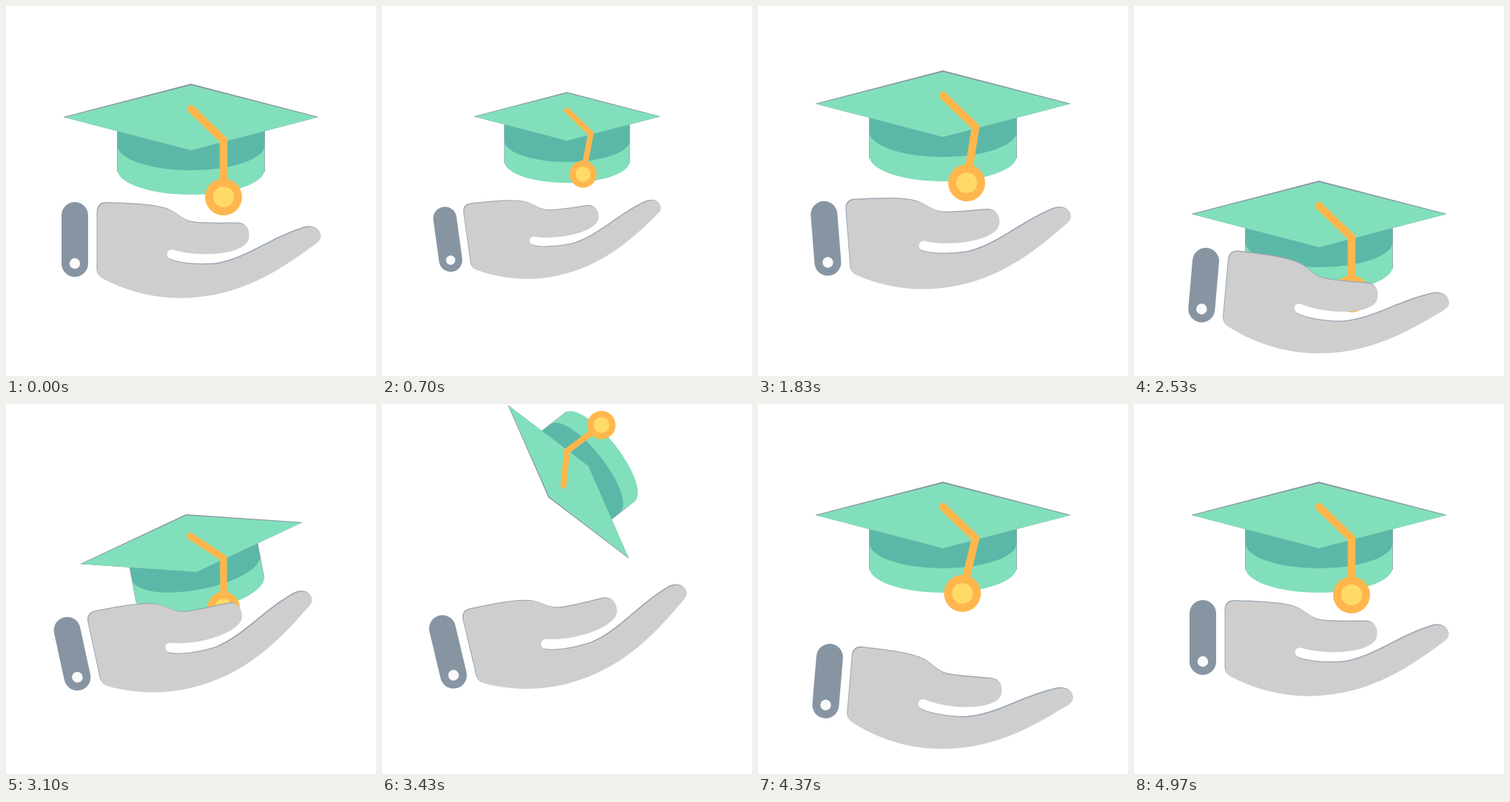
Animation, 500 px wide and 500 px high, one loop 5010 ms. Source, as an HTML page:

```html
<!DOCTYPE html>
<html lang="en">
<head>
<meta charset="utf-8">
<title>Graduation cap and hand</title>
<style>
html, body { margin: 0; width: 100%; height: 100%; overflow: hidden; background: #fff; }
svg { display: block; width: 100%; height: 100%; }
</style>
</head>
<body>
<svg viewBox="0 0 500 500">
  <defs>
    <path id="palm" d="M123 279Q123.500 266 136 266C170 267 205 268 222 276C238 284 240 292 262 293
      S295 293.500 312 293.500C325 293.500 329 302 328 312C327 322 318 326 308 330C285 337 250 337 225 329
      C216 328 215 338 221 342C235 349 265 350 285 348C325 341 355 315 401 300C412 296 425 300 425 311
      C425 318 415 323 407 329C350 371 300 394 234 394.500C190 394 155 381 131 368.500Q123.500 365 123 357Z"/>
    <path id="brim" d="M250 105L423 150L250 195L77 150Z"/>
  </defs>
  <g id="cap">
    <g id="body">
      <path fill="#82dfbb" d="M150.500 155V221A99.500 34 0 0 0 349.500 221V155Z"/>
      <path fill="#5bb8a8" d="M150.500 155V188A99.500 34 0 0 0 349.500 188V155Z"/>
      <path fill="none" stroke="#8795a3" stroke-opacity=".7" d="M150.500 160V224M349.500 160V224"/>
    </g>
    <g id="board">
      <use href="#brim" fill="#8795a3"/>
      <path fill="#82dfbb" d="M250 107L421 150.500L250 195L79 150.500Z"/>
      <g fill="none" stroke="#ffb74d" stroke-width="10.500" stroke-linecap="round">
        <path d="M250 139L294 181.500"/>
        <g id="tassel">
          <path d="M294 181.500V240"/>
          <circle cx="294" cy="258" r="25" fill="#ffb74d" stroke="none"/>
          <circle cx="294" cy="258" r="14" fill="#ffdb66" stroke="none"/>
        </g>
      </g>
    </g>
  </g>
  <g id="hand">
    <rect x="75" y="265" width="36" height="101" rx="18" fill="#8795a3"/>
    <circle cx="93" cy="348" r="7.200" fill="#fafafa"/>
    <use href="#palm" fill="#98a5b2" transform="translate(-.5 -1)"/>
    <use href="#palm" fill="#cecece" transform="translate(.5 .3)"/>
  </g>
</svg>
<script>
const LOOP = 5010;
const { PI, sin, cos } = Math;

// Progress from 0 to 1 between two times, and three shapes of it.
const ramp = (t, a, b) => Math.min(1, Math.max(0, (t - a) / (b - a)));
const ease = (t, a, b) => { const x = ramp(t, a, b); return x * x * (3 - 2 * x); };
const quint = (t, a, b) => { const x = ramp(t, a, b); return x < .5 ? 16 * x ** 5 : 1 - 16 * (1 - x) ** 5; };
const arc = (t, a, b) => sin(PI * ramp(t, a, b));

function place(id, x, y, dy, turn, size) {
  document.getElementById(id).setAttribute("transform",
    `translate(${x} ${y + dy}) rotate(${turn}) scale(${size}) translate(${-x} ${-y})`);
}

function draw(t) {
  // Everything shrinks, then swells, then settles.
  const pulse = -1.05 * ease(t, 30, 590) + 2.05 * ease(t, 590, 1130) - ease(t, 1130, 1420);

  // The hand lifts, dips, tosses the cap and comes home.
  const lift = ease(t, 1420, 1930);
  const dip = ease(t, 2100, 2510);
  const toss = ease(t, 2610, 3250) - ease(t, 3250, 4290);
  const home = ease(t, 4290, 4930);
  const handTurn = -5 * lift + 10 * dip - 20 * toss - 5 * home + 9.5 * pulse;
  const handY = 60 * dip - 40 * toss - 60 * home;

  // The cap follows, then spins once in the air.
  const capY = -20 * lift + 151 * dip - 131 * ease(t, 2640, 3360) - 43 * arc(t, 3080, 3910) ** 2;
  const capTurn = -360 * quint(t, 2590, 4390);
  const capSize = 1 - .24 * arc(t, 2721, 4278) ** 2;
  const ringing = -20 * arc(t, 2720, 4900) * cos(2 * PI * (t - 3770) / 1300);

  place("cap", 250, 147, capY, capTurn, capSize);
  place("body", 250, 147, 0, 0, 1 + .18 * pulse);
  place("board", 250, 147, 0, 0, 1 + .325 * pulse);
  place("tassel", 294, 181.5, 0, 10 * (lift - dip) + ringing - 13 * pulse, 1);
  place("hand", 75, 330, handY, handTurn, 1 + .15 * pulse);
}

const start = performance.now();
function frame() {
  draw((performance.now() - start) % LOOP);
  requestAnimationFrame(frame);
}
frame();
</script>
</body>
</html>
```
